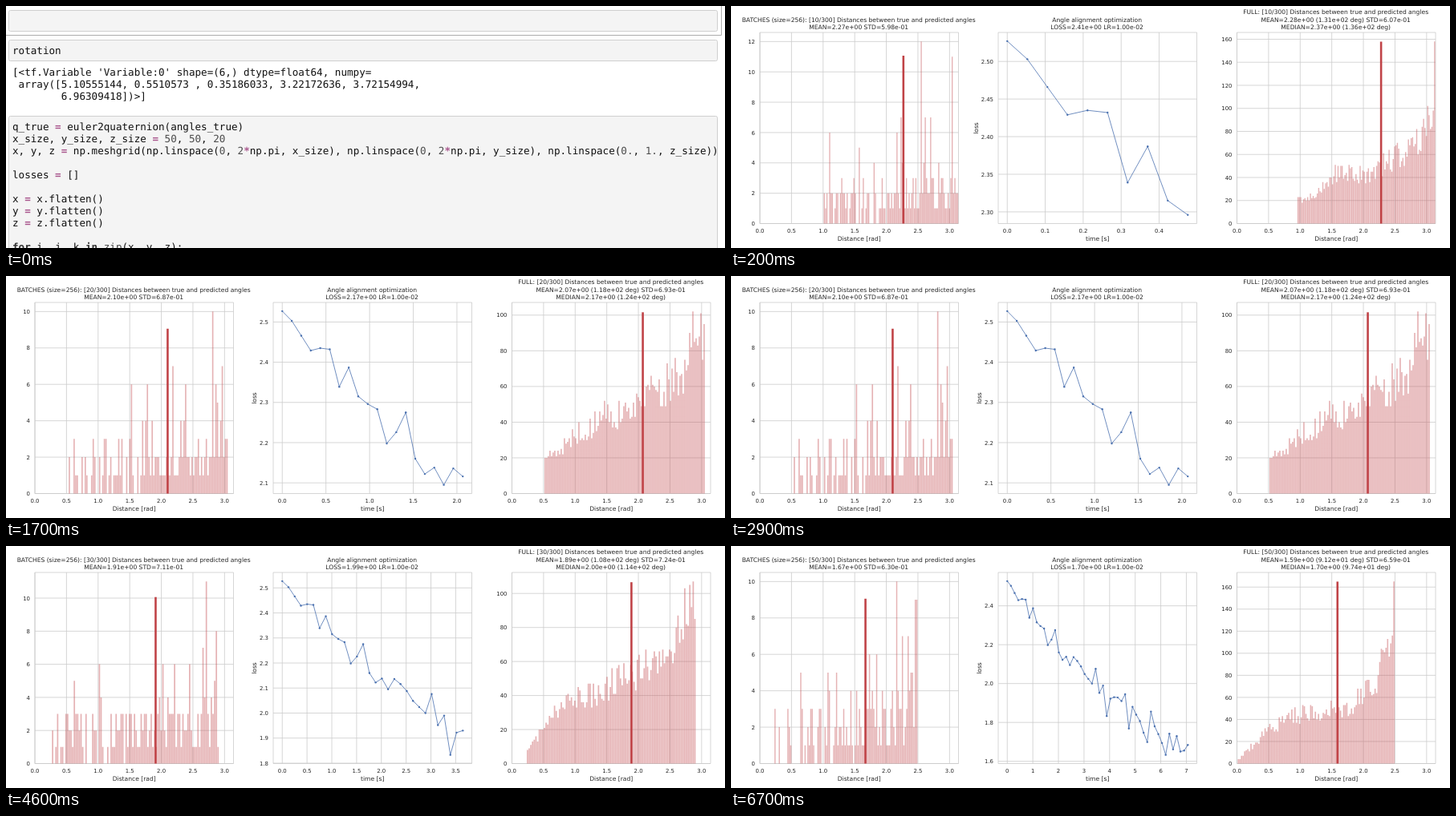
These frames come from a looping animation (896 px wide and 302 px high, 8000 ms). An HTML page:

```html
<!DOCTYPE html>
<html lang="en">
<head>
<meta charset="utf-8">
<title>Angle alignment</title>
<style>
html, body { margin: 0; width: 100%; height: 100%; overflow: hidden; background: #fff; }
svg { position: absolute; left: 0; top: 0; width: 896px; height: 302px; text-rendering: geometricPrecision; }
.chart { font: 7.58px "DejaVu Sans", sans-serif; fill: #262626; text-anchor: middle; }
.tick { font-size: 6.9px; }
.end { text-anchor: end; }
.grid { stroke: #ccc; stroke-width: .8; fill: none; }
.bars { fill: #c44e52; fill-opacity: .43; }
.mean { stroke: #c04347; stroke-width: 2.6; stroke-linecap: square; }
.loss { stroke: #4c72b0; stroke-width: .8; fill: none; }
.dots { fill: #4c72b0; }
.cell { fill: #f4f4f4; stroke: #cfcfcf; }
.rule { stroke: #ababab; fill: none; }
.code { font: 12.6px "DejaVu Sans Mono", monospace; fill: #111; }
.code text { white-space: pre; }
.num { fill: #4c4c4c; }
.op { fill: #a8548c; font-weight: bold; }
.key { fill: #333; font-weight: bold; }
.fn { fill: #444; }
.note { animation: note 8s step-end infinite; }
.scene { opacity: 0; animation: 8s step-end infinite; }
.scene:nth-child(1) { animation-name: s1; }
.scene:nth-child(2) { animation-name: s2; }
.scene:nth-child(3) { animation-name: s3; }
.scene:nth-child(4) { animation-name: s4; }
.scene:nth-child(5) { animation-name: s5; }
@keyframes note { 0% { opacity: 1 } 2.5%, 100% { opacity: 0 } }
@keyframes s1 { 0% { opacity: 0 } 1.25% { opacity: 1 } 21.25%, 100% { opacity: 0 } }
@keyframes s2 { 0% { opacity: 0 } 21.25% { opacity: 1 } 46.25%, 100% { opacity: 0 } }
@keyframes s3 { 0% { opacity: 0 } 46.25% { opacity: 1 } 65%, 100% { opacity: 0 } }
@keyframes s4 { 0% { opacity: 0 } 65% { opacity: 1 } 83.75%, 100% { opacity: 0 } }
@keyframes s5 { 0% { opacity: 0 } 83.75%, 100% { opacity: 1 } }
</style>
</head>
<body>
<svg viewBox="0 0 896 302">
  <g class="note">
    <path class="rule" d="M0 36.5H891.5V0"/>
    <rect class="cell" x="3.5" y="5.5" width="883" height="26" rx="2"/>
    <rect class="cell" x="3.5" y="42.5" width="883" height="26" rx="2"/>
    <rect class="cell" x="3.5" y="137.5" width="883" height="180" rx="2"/>
  </g>
  <g id="scenes"></g>
  <g class="note code" id="code"></g>
</svg>
<script>
const TOP = 33, BASE = 271.5, H = BASE - TOP, W = 247.5, RAD = W / Math.PI, BINS = 100;

// Loss after each step; every scene shows ten more.
const LOSS = [
  2.527, 2.503, 2.466, 2.429, 2.435, 2.432, 2.339, 2.387, 2.315, 2.296,
  2.283, 2.198, 2.226, 2.275, 2.16, 2.122, 2.138, 2.095, 2.136, 2.116,
  2.088, 2.049, 2.024, 2, 2.076, 1.952, 1.99, 1.833, 1.922, 1.93,
  1.928, 1.91, 1.945, 1.769, 1.88, 1.84, 1.807, 1.747, 1.699, 1.856,
  1.78, 1.74, 1.694, 1.633, 1.742, 1.661, 1.73, 1.65, 1.655, 1.684];

// span: data range in rad; peaks: count by bin; level: evenly spaced heights of the outline.
const SCENES = [
  { time: .4755, xStep: .1, yStep: .05, loss: 2.41,
    batch: { mean: 2.27, std: .598, span: [1.01, 3.14], peaks: { 4: 6, 26: 5, 54: 6, 57: 7, 72: 12, 75: 7, 79: 7, 95: 11 } },
    full: { mean: 2.28, deg: 131, std: .607, med: 2.37, medDeg: 136, span: [.957, 3.14],
      level: [20, 23, 42, 46, 40, 52, 60, 70, 100], peaks: { 99: 158 } } },
  { time: 2.067, xStep: .5, yStep: .1, loss: 2.17,
    batch: { mean: 2.1, std: .687, span: [.535, 3.055], peaks: { 39: 6, 49: 6, 65: 7, 73: 6, 90: 10, 92: 6, 96: 7 } },
    full: { mean: 2.07, deg: 118, std: .693, med: 2.17, medDeg: 124, span: [.515, 3.055],
      level: [18, 27, 36, 45, 44, 54, 60, 70, 95], peaks: { 92: 102 } } },
  { time: 3.643, xStep: .5, yStep: .1, loss: 1.99,
    batch: { mean: 1.91, std: .711, span: [.27, 2.913], peaks: { 13: 5, 28: 6, 66: 6, 73: 6, 82: 6, 90: 7, 92: 11, 98: 8 } },
    full: { mean: 1.89, deg: 108, std: .724, med: 2, medDeg: 114, span: [.235, 2.91],
      level: [8, 25, 37, 40, 47, 52, 58, 73, 103], peaks: { 98: 107 } } },
  { time: 5.626, xStep: 1, yStep: .2, loss: 1.84,
    batch: { mean: 1.84, std: .688, span: [.187, 2.71], peaks: { 29: 5, 68: 5, 80: 8, 86: 9, 88: 8, 90: 10, 96: 8, 98: 12 } },
    full: { mean: 1.74, deg: 99.7, std: .705, med: 1.85, medDeg: 106, span: [.09, 2.716],
      level: [3, 24, 36, 44, 48, 51, 59, 76, 115], peaks: { 99: 129 } } },
  { time: 7.056, xStep: 1, yStep: .2, loss: 1.7,
    batch: { mean: 1.67, std: .63, span: [.23, 2.495], peaks: { 18: 5, 37: 5, 43: 5, 66: 6, 71: 6, 85: 10, 89: 7, 93: 7, 98: 9, 99: 9 } },
    full: { mean: 1.59, deg: 91.2, std: .659, med: 1.7, medDeg: 97.4, span: [.013, 2.498],
      level: [4, 21, 36, 44, 46, 50, 55, 74, 118], peaks: { 99: 165 } } },
];

const sci = v => v.toExponential(2).replace(/(\d)$/, "0$1");
const label = (x, y, s, cls = "", extra = "") => `<text x="${x}" y="${y}" class="${cls}" ${extra}>${s}</text>`;

function random(seed) {
  return () => (seed = seed * 16807 % 2147483647) / 2147483647;
}

function axes(x, xs, ys, title, name) {
  let d = "", text = "";
  for (const [px, s] of xs) {
    d += `M${px} ${TOP}V${BASE}`;
    text += label(px, 282.6, s, "tick");
  }
  for (const [py, s] of ys) {
    d += `M${x} ${py}h${W}`;
    text += label(x - 6, py + 2.6, s, "tick end");
  }
  title.forEach((s, i) => text += label(x + W / 2 - .6, 29.2 - 9.7 * (title.length - 1 - i), s));
  text += label(x + W / 2, 293.4, name);
  return `<path class="grid" d="${d}M${x} ${TOP}h${W}V${BASE}h${-W}z"/>` + text;
}

function ticks(lo, hi, step, place, digits) {
  const out = [];
  for (let k = Math.ceil(lo / step); k * step <= hi; k++) out.push([place(k * step), (k * step).toFixed(digits)]);
  return out;
}

// Without an outline the counts are small random ones that rise to the right.
function counts({ level, peaks }, max, rnd) {
  return Array.from({ length: BINS }, (_, i) => {
    const t = i / (BINS - 1), r = rnd();
    if (peaks[i]) return peaks[i];
    if (!level) return Math.floor(3.6 * r ** 1.4 + 1.6 * t);
    const p = t * (level.length - 1), k = Math.min(Math.floor(p), level.length - 2);
    const v = level[k] + (p - k) * (level[k + 1] - level[k]);
    return Math.min(max, Math.round(v * (.8 + .4 * r)));
  });
}

function histogram(x, h, step, title, rnd) {
  const max = Math.max(...Object.values(h.peaks)), [from, to] = h.span;
  const py = v => BASE - v * H / (max * 1.05);
  const w = (to - from) * RAD / BINS, mx = x + h.mean * RAD;
  const bars = counts(h, max, rnd).map((v, i) =>
    v ? `M${(x + from * RAD + i * w).toFixed(2)} ${BASE}V${py(v).toFixed(2)}h${(w * .82).toFixed(2)}V${BASE}z` : "").join("");
  return axes(x, ticks(0, 3, .5, v => x + v * RAD, 1), ticks(0, max * 1.05, step, py, 0), title, "Distance [rad]") +
    `<path class="bars" d="${bars}"/><path class="mean" d="M${mx} ${BASE - 1.3}V${py(max - 1)}"/>`;
}

function lossPlot(x, s, count) {
  const data = LOSS.slice(0, count), lo = Math.min(...data), hi = Math.max(...data), pad = (hi - lo) * .05;
  const px = t => x + W * (t / s.time + .05) / 1.1;
  const py = v => BASE - (v - lo + pad) * H / (hi - lo + 2 * pad);
  const pts = data.map((v, i) => [px(s.time * i / (count - 1)), py(v)]);
  const lx = s.yStep < .1 ? 307.5 : 312;
  return axes(x, ticks(0, s.time * 1.05, s.xStep, px, s.xStep < 1 ? 1 : 0),
      ticks(lo - pad, hi + pad, s.yStep, py, s.yStep < .1 ? 2 : 1),
      ["Angle alignment optimization", `LOSS=${sci(s.loss)} LR=1.00e-02`], "time [s]") +
    label(lx, 152.5, "loss", "", `transform="rotate(-90 ${lx} 152.5)"`) +
    `<polyline class="loss" points="${pts.join(" ")}"/>` +
    `<g class="dots">${pts.map(p => `<circle cx="${p[0]}" cy="${p[1]}" r="1.2"/>`).join("")}</g>`;
}

function scene(s, i) {
  const count = 10 * (i + 1), rnd = random(471100 + 9700 * i), { batch: b, full: f } = s;
  const head = `[${count}/300] Distances between true and predicted angles`;
  const back = i ? `<rect width="896" height="302" fill="#fff"/>` : `<rect x="8" width="874" height="299" fill="#fff"/>`;
  return `<g class="scene chart">${back}` +
    histogram(36, b, 2, [`BATCHES (size=256): ${head}`, `MEAN=${sci(b.mean)} STD=${sci(b.std)}`], rnd) +
    lossPlot(333, s, count) +
    histogram(630.5, f, 20, [`FULL: ${head}`,
      `MEAN=${sci(f.mean)} (${sci(f.deg)} deg) STD=${sci(f.std)}`, `MEDIAN=${sci(f.med)} (${sci(f.medDeg)} deg)`], rnd) + "</g>";
}

const OUTPUT = [
  [87, "[&lt;tf.Variable 'Variable:0' shape=(6,) dtype=float64, numpy="],
  [102, " array([5.10555144, 0.5510573 , 0.35186033, 3.22172636, 3.72154994,"],
  [117, "        6.96309418])>]"]];
const CODE = [
  [60, "rotation"],
  [155, "q_true = euler2quaternion(angles_true)"],
  [170, "x_size, y_size, z_size = 50, 50, 20"],
  [185, "x, y, z = np.meshgrid(np.linspace(0, 2*np.pi, x_size), np.linspace(0, 2*np.pi, y_size), np.linspace(0., 1., z_size))"],
  [215, "losses = []"],
  [245, "x = x.flatten()"],
  [260, "y = y.flatten()"],
  [275, "z = z.flatten()"],
  [305, "for i, j, k in zip(x, y, z):"]];

const paint = s => s.replace(/\b(?:for|in|zip)\b|\b\d+\.?|[=*]/g, t =>
  `<tspan class="${/\d/.test(t) ? "num" : t === "zip" ? "fn" : /\w/.test(t) ? "key" : "op"}">${t}</tspan>`);

document.getElementById("scenes").innerHTML = SCENES.map(scene).join("");
document.getElementById("code").innerHTML =
  OUTPUT.map(([y, s]) => label(8, y, s)).join("") + CODE.map(([y, s]) => label(8, y, paint(s))).join("");
</script>
</body>
</html>
```
